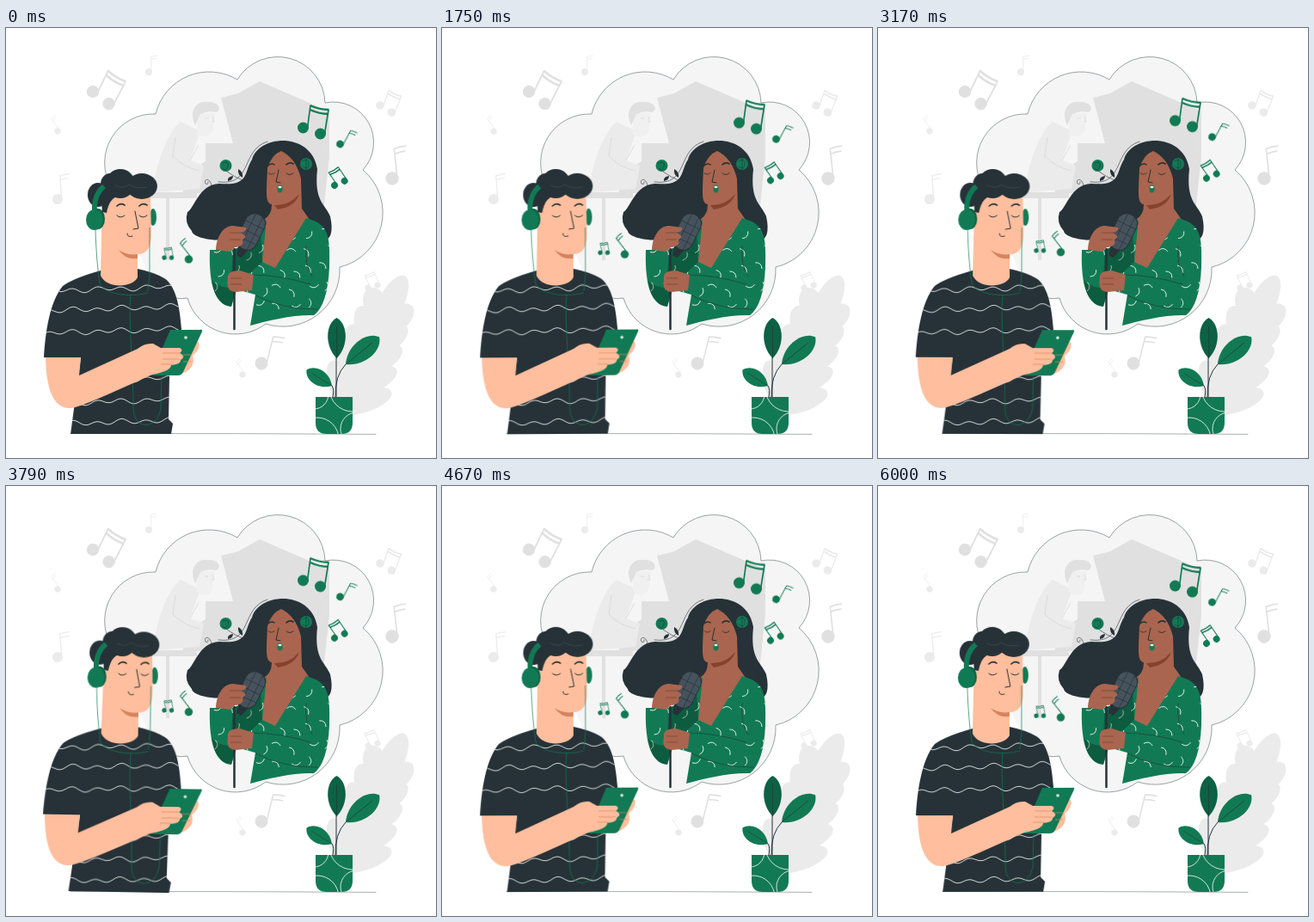
An HTML page for the animation above (6.04 s loop, 500x500 px).

```html
<!DOCTYPE html>
<html lang="en">
<head>
<meta charset="utf-8">
<title>Listening to music</title>
<style>
  html, body { margin: 0; width: 100%; height: 100%; overflow: hidden; background: #fff; }
  svg { display: block; width: 100vw; height: 100vh; }
  .green { fill: #117a55; color: #117a55; }
  .deep { fill: #0d6144; }
  .dark { fill: #263238; }
  .skin { fill: #ffbe9d; }
  .brown { fill: #a9654f; }
  .grey { fill: #e0e0e0; color: #e0e0e0; }
  .pale { fill: #ebebeb; color: #ebebeb; }
  .shade { fill: #000; opacity: .25; }
  .line { fill: none; stroke: #263238; stroke-linecap: round; stroke-linejoin: round; }
  .thin { stroke-width: .6; }
  .white { fill: none; stroke: #fff; stroke-width: .8; stroke-linecap: round; }
  .wire { fill: none; stroke: #117a55; stroke-width: .7; }
  .crease { fill: none; stroke: #d6845e; stroke-width: .7; }
  .stem { fill: none; stroke: currentColor; }
  #man { transform-origin: 128px 325px; animation: sway 3020ms -2300ms infinite; }
  #float { animation: rise 3020ms -185ms linear infinite alternate; }
  @keyframes sway {
    0%, 100% { transform: rotate(1deg); animation-timing-function: cubic-bezier(.3, .3, .4, 1); }
    50% { transform: rotate(-.4deg); animation-timing-function: cubic-bezier(.6, 0, .7, .7); }
  }
  @keyframes rise {
    from { transform: translateY(.6px); }
    to { transform: translateY(-9.4px); }
  }
</style>
</head>
<body>
<svg viewBox="0 0 500 500">
  <defs>
    <g id="pair">
      <circle r="6.5"/><circle cx="20" cy="7" r="6.5"/>
      <path class="stem" stroke-width="1.7" d="M5 0L8.500-26M25 7L29.500-21"/>
      <path class="stem" stroke-width="2.4" d="M8 -26q11 5 22 5m-22 0q11 5 21 5"/>
    </g>
    <g id="single">
      <circle r="6.5"/>
      <path class="stem" stroke-width="1.4" d="M5 0L4-29q6-2 12-2M4-24q6-2 11-2"/>
    </g>
    <g id="eye" class="line">
      <path d="M0 12q4 4 9 0"/>
      <path stroke-width="1.7" d="M0 1q4-4 9-1"/>
    </g>
    <g id="leaf">
      <path d="M0 0C-14-14-13-40 0-47C13-40 14-14 0 0"/>
      <path class="line thin" d="M0 0V-37"/>
    </g>
    <!-- open path, so the hidden side has no outline -->
    <path id="cloud" d="M122 185A57 57 0 0 1 174 100A64 64 0 0 1 269 60A55 55 0 0 1 371 87A47 47 0 0 1 415 165A65 65 0 0 1 388 278A66 66 0 0 1 302 344A58 58 0 0 1 211 314A40 40 0 0 1 165 285"/>
    <path id="shirt" d="M110 282Q78 291 66 300C51 318 46 352 44 383H87L75 472H192L194 460L189 455L190 404L204 350C202 325 198 300 184 291Q172 284 153 280Z"/>
    <path id="dress" d="M303 222Q292 250 262 258H237C236 290 240 322 262 324L268 304L290 310L284 346C305 340 335 333 358 334Q374 322 376 278C377 240 375 228 349 221L313 279L298 272Z"/>
    <path id="pot" d="M360 429H403V459Q403 472 390 472H373Q360 472 360 459Z"/>
    <clipPath id="inCloud"><use href="#cloud"/></clipPath>
    <clipPath id="inShirt"><use href="#shirt"/></clipPath>
    <clipPath id="inDress"><use href="#dress"/></clipPath>
    <clipPath id="inPot"><use href="#pot"/></clipPath>
  </defs>

  <g class="grey">
    <use href="#pair" transform="translate(101 74) rotate(18) scale(1.1)"/>
    <use href="#single" transform="translate(449 175) rotate(-4) scale(1.18)"/>
    <use href="#single" transform="translate(297 390) rotate(16) scale(1.15)"/>
  </g>
  <g class="pale">
    <use href="#pair" transform="translate(435 90) rotate(12) scale(.74)"/>
    <use href="#pair" transform="translate(421 302) rotate(-34) scale(.54)"/>
    <use href="#single" transform="translate(60 199) rotate(-2) scale(.93)"/>
    <use href="#single" transform="translate(60 120) rotate(-35) scale(.55)"/>
    <use href="#single" transform="translate(166 51) scale(.6)"/>
    <use href="#single" transform="translate(275 403) rotate(-34) scale(.55)"/>
    <g id="bigLeaf"></g>
  </g>

  <path class="line thin" opacity=".65" d="M75 471.600H262L430 472.400"/>

  <!-- thought cloud with the pianist -->
  <use href="#cloud" fill="#f5f5f5"/>
  <g clip-path="url(#inCloud)">
    <path class="grey" d="M250 81L270 76L295 62L376 97V150L369 215H290V192H205Q213 166 232 155V134H264Z"/>
    <path class="pale" d="M171 191C174 155 190 118 203 109L226 120L214 154L230 160L225 187Z"/>
    <path fill="#f0f0f0" d="M222 99V124Q238 132 241 116L243 99Z"/>
    <path class="grey" d="M220 113C212 96 222 84 234 86C247 85 252 95 244 98Q234 96 226 100Z"/>
    <path fill="none" stroke="#d3d3d3" stroke-width=".7" d="M197 127L194 149Q206 162 225 166M214 154L224 136M240 103L242 109H239M231 105h4"/>
    <path class="grey" d="M156 191H222V198H190V270H186V198H156Z"/>
  </g>
  <use href="#cloud" class="line thin" opacity=".75"/>

  <!-- singer -->
  <path class="dark" d="M286 153C294 124 355 120 362 164C358 202 371 204 377 219Q383 247 367 248L325 226L294 238C270 252 218 248 216 236Q207 226 211 214C219 210 224 182 248 181C284 184 276 168 286 153Z"/>
  <path class="line thin" d="M304 132C272 142 288 184 247 179"/>
  <path class="brown" d="M304 163Q309 147 320 143Q337 151 343 175L344 210L353 223L313 282L297 274L301 222Q309 217 309 205C301 204 303 190 304 163Z"/>
  <path fill="#85432f" d="M312 206Q329 207 341 193Q336 208 316 211Z"/>
  <use href="#eye" transform="translate(305 159) scale(.8)"/>
  <use href="#eye" transform="translate(326 158) scale(.9)"/>
  <path class="line" d="M317 165L314 179L319 180"/>
  <ellipse class="green" cx="318.500" cy="187" rx="3" ry="4.500"/>
  <ellipse cx="318.500" cy="185" rx="2" ry="1.200" fill="#fff"/>
  <use href="#dress" class="green"/>
  <g clip-path="url(#inDress)">
    <g id="stitches" class="white"></g>
    <path class="shade" d="M236 290Q246 304 270 302V330H236ZM264 258L296 236L298 272L284 285L262 286Z"/>
    <path class="line thin" d="M349 253Q347 276 356 289M286 287Q318 287 354 298M286 309Q322 328 362 327"/>
  </g>
  <path class="line" stroke-width="2.500" d="M265.500 257V350"/>
  <g transform="translate(285 237) rotate(26)">
    <path class="dark" d="M-7 18H7L3 32H-3Z"/>
    <rect x="-12" y="-22" width="24" height="44" rx="11" fill="#46525c" stroke="#263238"/>
    <path class="line thin" d="M-12-9H12M-12 1H12M-12 11H12M-4-21V21M5-21V21"/>
  </g>
  <path class="brown" d="M244 258C245 240 254 230 264 230L279 232Q281 237 272 238Q283 242 275 246Q278 254 266 255L260 260Z"/>
  <path class="brown" d="M288 287L272 282Q256 282 258 292Q255 306 267 307L286 305Z"/>
  <path fill="none" stroke="#75402f" stroke-width=".7" d="M260 238h13M260 246h13M261 291h13M261 298h13"/>
  <g class="green">
    <circle cx="349" cy="158" r="7"/>
    <circle cx="255.500" cy="160" r="7"/>
  </g>
  <path class="line thin" d="M345 155q7-5 7 3t-7 3M349 151v14M252 157q8-3 6 4t-6 2M257 167Q267 174 275 177M239 187C240 174 229 174 232 181q3 2 3-2"/>
  <path class="dark" d="M258 178q-1-5 6-6q0 5-6 6zM275 174q-6-3-5-10q6 3 5 10z"/>

  <g id="float" class="green">
    <use href="#pair" transform="translate(345.500 116)"/>
    <use href="#pair" transform="translate(382 183) rotate(-43) scale(.6)"/>
    <use href="#pair" transform="translate(184 267) rotate(-19) scale(.4)"/>
    <use href="#single" transform="translate(388.500 135) rotate(30) scale(.68)"/>
    <use href="#single" transform="translate(212.500 269) rotate(-36) scale(.72)"/>
  </g>

  <!-- potted plant -->
  <path class="line" d="M384 430V380M383 430Q382 404 395 391M380 429Q382 420 379 416"/>
  <use href="#leaf" class="deep" transform="translate(384.500 384) scale(1.020 1)"/>
  <use href="#leaf" class="green" transform="translate(395 391) rotate(51) scale(1.150 1.070)"/>
  <use href="#leaf" class="green" transform="translate(379 416) rotate(-58) scale(.9 .74)"/>
  <use href="#pot" class="green"/>
  <g clip-path="url(#inPot)" class="white">
    <circle cx="358" cy="426" r="17"/>
    <circle cx="403" cy="419" r="27"/>
    <circle cx="362" cy="478" r="25"/>
    <circle cx="408" cy="466" r="19"/>
  </g>

  <!-- listener -->
  <g id="man">
    <ellipse class="green" cx="171" cy="220" rx="4" ry="10"/>
    <ellipse class="dark" cx="107" cy="194" rx="12" ry="14"/>
    <use href="#shirt" class="dark"/>
    <g clip-path="url(#inShirt)">
      <g id="waves" class="white"></g>
      <path class="shade" d="M84 408L79 440Q120 430 154 403H190V380Z"/>
    </g>
    <path class="skin" d="M112 202Q140 182 168 194L169 240Q169 263 153 263V290C147 302 118 304 110 288Z"/>
    <path fill="#d6845e" d="M131 258Q141 265 153 263V268Q139 270 131 258Z"/>
    <g class="dark">
      <path d="M112 214L110 188L150 180L131 195Q120 198 117 215Z"/>
      <ellipse cx="133" cy="181" rx="17" ry="17"/>
      <ellipse cx="121" cy="182" rx="11" ry="13"/>
      <ellipse cx="158" cy="184" rx="18" ry="15"/>
    </g>
    <path class="line thin" style="stroke:#46525c" d="M127 183q9 5 16-1q10 6 21 3"/>
    <use href="#eye" transform="translate(129 206)"/>
    <use href="#eye" transform="translate(155 206)"/>
    <path class="line" d="M150 213L154 233L148 234M141 239q0 5 6 3"/>
    <path fill="none" class="wire" style="stroke-width:6" d="M103 213Q102 194 114 184"/>
    <ellipse class="deep" cx="107" cy="222" rx="8" ry="12"/>
    <ellipse class="green" cx="103" cy="223" rx="10" ry="12"/>
    <path class="wire" d="M104 235Q105 270 109 297C113 309 143 314 165 308M167 232V287L165 306M145 310C142 340 148 390 148 442C148 468 176 468 180 442L181 402"/>

    <!-- far hand, phone, near arm -->
    <path class="skin" d="M198 372L215 363L224 365Q227 373 217 381Q221 394 207 401Q199 403 197 395Z"/>
    <path class="green" d="M191 351H225Q229 350 228 353L206 400Q204 404 200 404H168Z"/>
    <circle cx="209" cy="360" r="1.800" fill="#dceee6"/>
    <path class="skin" d="M46 383H87L85 404L153 373Q161 366 171 367L180 372H202Q207 374 202 378Q210 382 203 386Q204 391 192 392Q192 399 170 403C140 416 93 439 76 442Q47 444 46 383Z"/>
    <path class="crease" d="M182 378h20M182 385h20M180 391h13M206 380h10M206 388h9"/>
  </g>
</svg>

<script>
  const fill = (id, parts) => { document.getElementById(id).innerHTML = parts.join(''); };
  const range = n => Array.from({ length: n }, (_, i) => i);
  const rand = n => Math.abs(Math.sin(n * 127.1 + 3) * 43758.5) % 1;

  // Lobes on both sides of a rising midrib, with a long one at the tip.
  const lobe = (x, y, rx, ry, turn) =>
    `<ellipse rx="${rx}" ry="${ry}" transform="translate(${x} ${y}) rotate(${turn})"/>`;
  fill('bigLeaf', [
    lobe(446, 323, 39, 15, -63),
    ...range(5).map(i => {
      const x = 396 + i * 10, y = 434 - i * 24;
      return lobe(x + 20, y, 34 - i * 3, 13, -18 - i * 6) + lobe(x - 6, y - 16, 33 - i * 3, 14, -110);
    }),
  ]);

  // Shirt stripes: uneven sine waves.
  const stripe = y => 'M' + range(56).map(i => {
    const x = 42 + i * 3;
    return `${x} ${(y - i * .1 + 2.4 * Math.sin(x / 4.5) + 1.2 * Math.sin(x / 9 + y)).toFixed(1)}`;
  }).join('L');
  fill('waves', [306, 329, 355, 412, 437, 461].map(y => `<path d="${stripe(y)}"/>`));

  // Short curved stitches scattered on a loose grid.
  fill('stitches', range(40).map(i => {
    const x = 241 + (i % 8) * 18 + rand(i) * 10;
    const y = 234 + Math.floor(i / 8) * 21 + rand(i + 50) * 12;
    return `<path d="M-5 0Q0-5 5 0" transform="translate(${x} ${y}) rotate(${rand(i + 90) * 180})"/>`;
  }));
</script>
</body>
</html>
```
